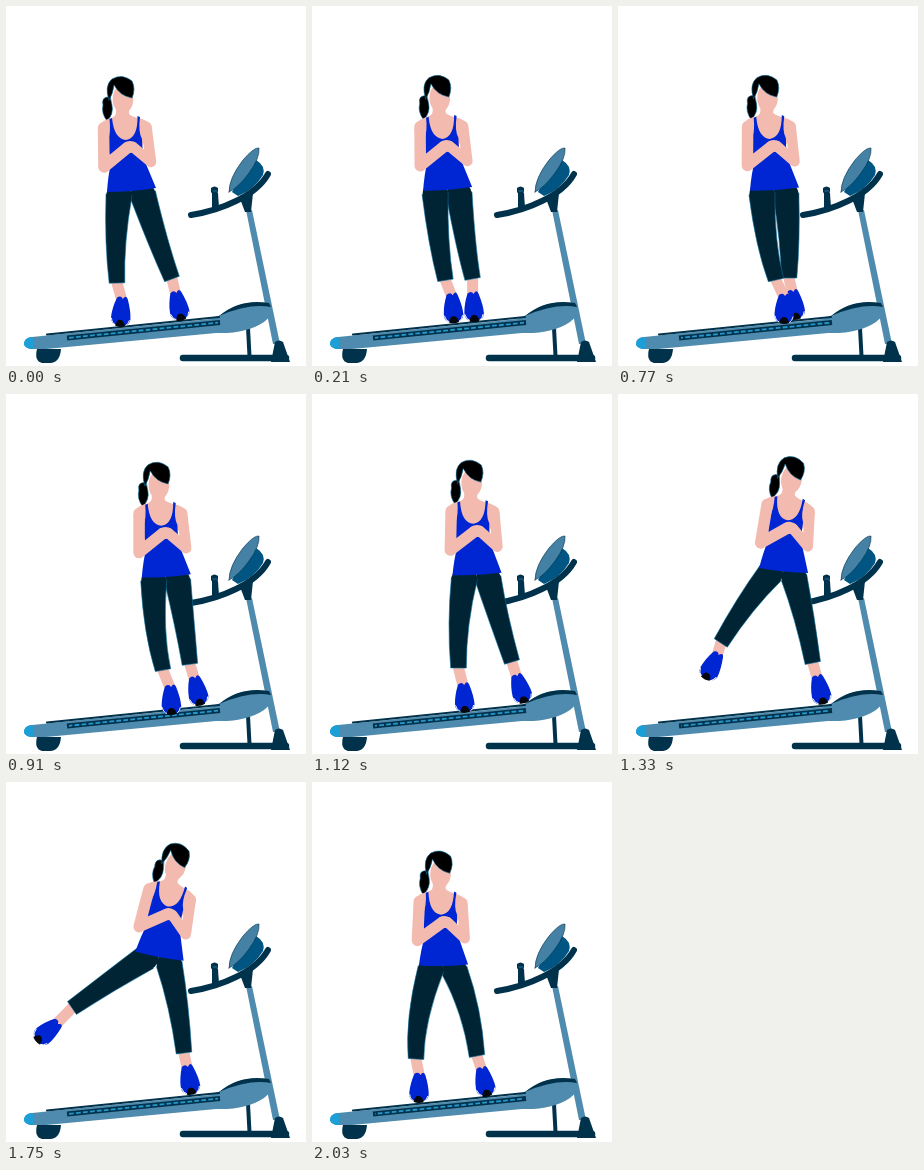
These frames come from a looping animation (300x360 px, 2100 ms). An HTML page with a canvas:

```html
<!DOCTYPE html>
<html lang="en">
<head>
<meta charset="utf-8">
<title>Treadmill side steps</title>
<style>
html, body { margin: 0; width: 300px; height: 360px; overflow: hidden; background: #fff; }
canvas { display: block; }
</style>
</head>
<body>
<canvas id="stage" width="300" height="360"></canvas>
<script>
const ctx = document.getElementById('stage').getContext('2d');
const LOOP = 2100, STEP = 70;
const NAVY = '#00324c', STEEL = '#4f8bae', SKIN = '#f3bab0', BLUE = '#0025d2', LEGGING = '#002434', EDGE = '#0b6f9c';

// time, hem x, hem y, lean in degrees
const body = [
  [0, 125, 184, 0], [245, 137, 183, 0.5], [490, 149.5, 186, 1], [770, 156, 183, 1],
  [1120, 164.5, 180, 2], [1470, 164, 174, 16], [1610, 159, 173, 16.5],
  [1750, 153, 174, 15.5], [2030, 131, 183, 3.5]
];
// time, knee x y, cuff x y, shoe x y, shoe angle
const kickLeg = [
  [0, 110, 235, 111, 277, 115, 305, 4], [245, 130, 234, 137, 274, 145, 301, -6],
  [490, 152, 235, 160, 273, 174, 301, -8], [770, 149, 235, 158, 274, 166, 302, 0],
  [1120, 147, 230, 146.5, 274, 152, 303, -4], [1470, 112, 199, 72, 230, 52, 248, 50],
  [1610, 104, 195, 62, 220, 31, 240, 56], [1750, 102, 201, 66, 226, 42, 249, 50],
  [2030, 107, 235, 104, 277, 107, 305, 2]
];
const baseLeg = [
  [0, 152, 235, 166, 273, 172, 299, -12], [490, 159, 235, 156, 273, 152, 301, 4],
  [770, 171, 233, 171, 272, 176, 298, -8], [1120, 187, 225, 200, 268, 208, 294, -17],
  [1470, 183, 225, 188, 270, 194, 296, -10], [1750, 172, 225, 178, 271, 183, 297, -10],
  [2030, 157, 230, 165, 274, 172, 299, -12]
];

// Smooth cyclic interpolation through the keys
function sample(keys, t) {
  const n = keys.length;
  const at = i => {
    const k = keys[(i + n) % n];
    return [k[0] + Math.floor(i / n) * LOOP, ...k.slice(1)];
  };
  let i = n - 1;
  while (keys[i][0] > t) i--;
  const [a, b, c, d] = [at(i - 1), at(i), at(i + 1), at(i + 2)];
  const span = c[0] - b[0], u = (t - b[0]) / span;
  return b.slice(1).map((p, j) => {
    const q = c[j + 1];
    const m0 = (q - a[j + 1]) / (c[0] - a[0]) * span;
    const m1 = (d[j + 1] - p) / (d[0] - b[0]) * span;
    const s = u * u * (3 - 2 * u);
    return p + (q - p) * s + m0 * u * (1 - u) ** 2 - m1 * u * u * (1 - u);
  });
}

function fill(d, color, edge) {
  const path = new Path2D(d);
  ctx.fillStyle = color;
  ctx.fill(path);
  if (edge) {
    ctx.strokeStyle = edge;
    ctx.lineWidth = 0.6;
    ctx.stroke(path);
  }
}

function line(d, color, width, cap = 'round') {
  ctx.strokeStyle = color;
  ctx.lineWidth = width;
  ctx.lineCap = cap;
  ctx.lineJoin = 'round';
  ctx.stroke(new Path2D(d));
}

function ellipse(x, y, rx, ry, color, turn = 0) {
  ctx.fillStyle = color;
  ctx.beginPath();
  ctx.ellipse(x, y, rx, ry, turn, 0, 7);
  ctx.fill();
}

function placed(x, y, degrees, draw) {
  ctx.save();
  ctx.translate(x, y);
  ctx.rotate(degrees * Math.PI / 180);
  draw();
  ctx.restore();
}

function treadmill(t) {
  line('M242 322L243.5 350', NAVY, 4);
  line('M177 352H280', NAVY, 6.5);
  fill('M240 204L246 204L274 338L267 338Z', STEEL);
  fill('M269 336Q273 333 277 336L284 356H265Z', NAVY);
  fill('M31 343H55Q54 356 45 357H36Q28 355 31 343Z', NAVY);

  // Deck and motor hood
  fill('M26 331L205 313Q218 308 228 301Q246 293 265 300Q268 309 258 316Q240 328 210 327L40 343H24Q17 341 19 335Q21 331 26 331Z', STEEL);
  fill('M26 331Q17 332 18 339Q20 343 27 343Q30 337 26 331Z', '#1b9fd6');
  line('M41 328.5L213 311', NAVY, 2.2);
  fill('M213 310Q234 292 263 297L265 301Q243 297 213 310Z', NAVY);

  // Running belt
  line('M61 332L214 316.5', NAVY, 5, 'butt');
  ctx.setLineDash([4.8, 2.2]);
  ctx.lineDashOffset = t / LOOP * 84;
  line('M63 331.8L212 316.7', '#2497cd', 1.8, 'butt');
  ctx.setLineDash([]);

  // Bottle, handle and console
  fill('M206 187H212L213 202L206 204Z', NAVY);
  fill('M205 182Q208.5 179 212 182V186L210 189H207L205 186Z', NAVY);
  line('M207 185H211', '#2f7ba5', 0.8);
  fill('M226 186Q238 162 250 154Q260 160 257 169Q248 184 232 190Z', '#005582');
  line('M185 209Q210 205 230 195Q253 184 262 168', NAVY, 6);
  fill('M233 190L247 187L245 206H239Z', NAVY);
  fill('M223 186Q223 172 237 154Q248 141 253 142Q254 152 243 167Q232 182 223 186Z', '#4481a4', NAVY);
}

function leg(hip, [kx, ky, cx, cy, sx, sy, angle]) {
  const [hx, hy] = hip;
  const turn = angle * Math.PI / 180;
  line(`M${cx} ${cy}L${sx + 11 * Math.sin(turn)} ${sy - 11 * Math.cos(turn)}`, SKIN, 11);

  placed(sx, sy, angle, () => {
    fill('M-5 -13Q-1 -16 1 -12Q4 -17 6 -12Q10 0 10 8Q9 15 0 15Q-10 15 -9.5 6Q-9 -3 -5 -13Z', BLUE);
    fill('M-5 15Q-3 8 0 9Q4 9 5 15Q0 17 -5 15Z', '#05070d');
    line('M-9 8Q-8 13 -5 14M9 9Q8 13 6 14', '#fff', 0.9);
  });

  // Tapered limb: both sides curve through the knee
  const side = (x, y, dx, dy, half) => {
    const len = Math.hypot(dx, dy);
    return [x - dy / len * half, y + dx / len * half];
  };
  const edge = s => {
    const a = side(hx, hy, kx - hx, ky - hy, 13 * s);
    const k = side(kx, ky, cx - hx, cy - hy, 10 * s);
    const c = side(cx, cy, cx - kx, cy - ky, 7.8 * s);
    return { a, c, q: k.map((v, i) => 2 * v - (a[i] + c[i]) / 2) };
  };
  const l = edge(1), r = edge(-1);
  fill(`M${l.a}Q${l.q} ${l.c}L${r.c}Q${r.q} ${r.a}Z`, LEGGING, EDGE);
  ellipse(hx, hy, 12.5, 12.5, LEGGING);
}

function torso() {
  ctx.translate(-125, -184);
  fill('M104 91Q95 90 97 99Q95 107 101 115Q108 108 106 99Z', '#000', EDGE);
  fill('M110 98H123V108Q126 111 136 113Q146 116 146 125L136 140H104L92 126Q92 116 102 113Q110 111 110 107Z', SKIN);
  ellipse(117, 93, 10.3, 14.5, SKIN);
  fill('M103 94Q98 80 106 73Q116 67 126 75Q130 83 126 92Q114 90 108 79Q107 88 103 94Z', '#000', EDGE);
  fill('M103.500 113L106 112Q108 133 120 134Q132 132 131.500 110L134 111Q132 126 136 133Q136 146 140 158Q145 170 150 182Q126 186 101 186Q102 170 105 157Q102 145 102 134Q105 126 103.500 113Z', BLUE);
  line('M97.500 122L98 161L121 142', SKIN, 11.5);
  line('M140.500 121L145 156L127 141', SKIN, 10.5);
  ellipse(124, 141, 8, 6, SKIN);
}

function woman(t) {
  const [x, y, lean] = sample(body, t);
  const a = lean * Math.PI / 180;
  const hip = dx => [x + dx * Math.cos(a) - 5 * Math.sin(a), y + dx * Math.sin(a) + 5 * Math.cos(a)];
  leg(hip(12), sample(baseLeg, t));
  leg(hip(-12), sample(kickLeg, t));
  placed(x, y, lean, torso);
}

const start = performance.now();
function frame() {
  const t = Math.floor((performance.now() - start) % LOOP / STEP) * STEP;
  ctx.fillStyle = '#fff';
  ctx.fillRect(0, 0, 300, 360);
  treadmill(t);
  woman(t);
  requestAnimationFrame(frame);
}
frame();
</script>
</body>
</html>
```
